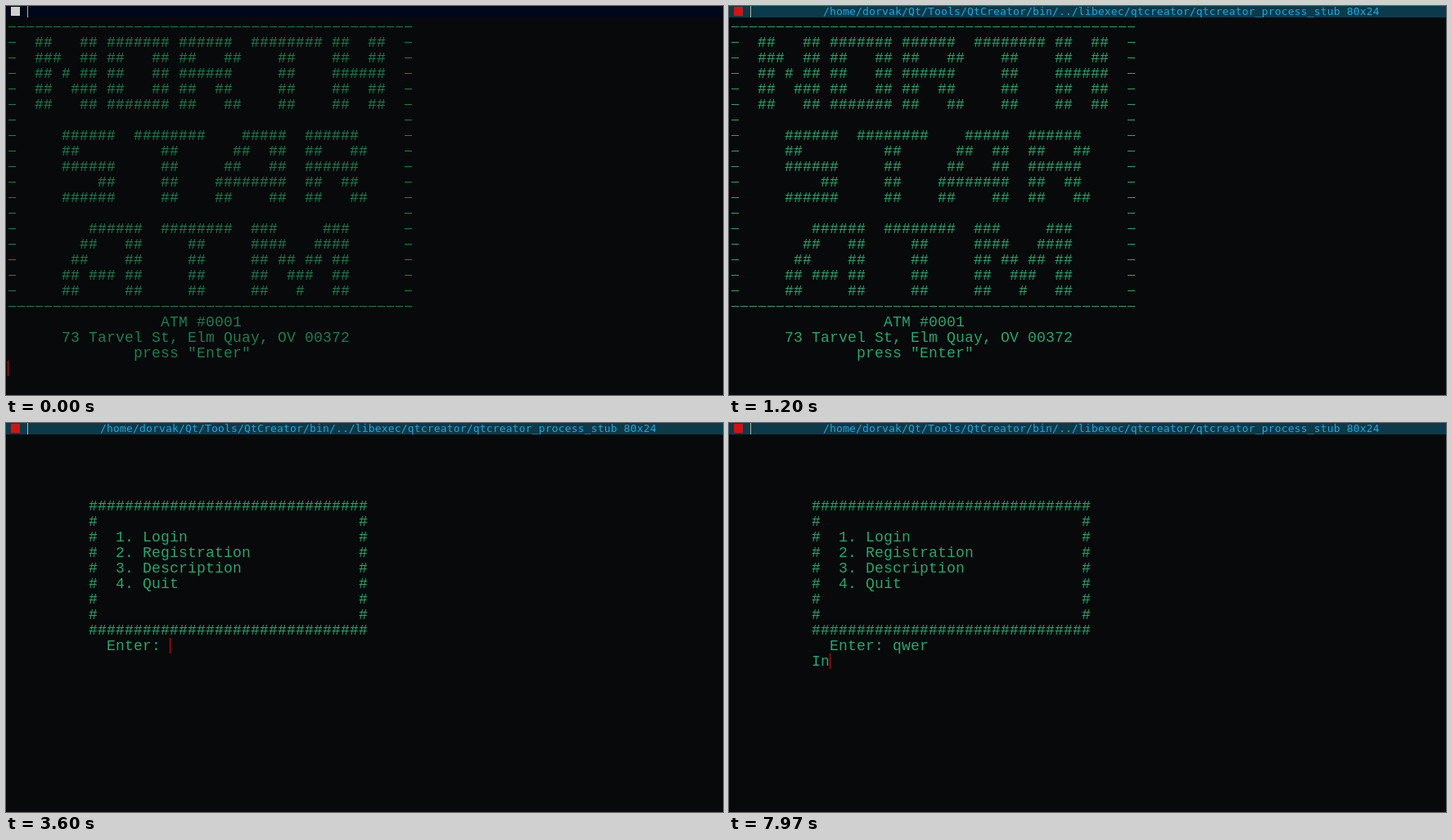
An HTML page for the animation above (8 s loop, 876x476 px).

```html
<!DOCTYPE html>
<html lang="en">
<meta charset="utf-8">
<title>Terminal</title>
<style>
  html, body { margin: 0; width: 100%; height: 100%; overflow: hidden; background: #07090a; }
  body { position: relative; --ink: #1c7d55; --bar: #00061c; --mark: #d0d0c8; }
  body.focused { --ink: #27a673; --bar: #0b3a4a; --mark: #d01414; }
  body * { position: absolute; }
  #bar { left: 0; top: 0; width: 876px; height: 14px; background: var(--bar); }
  #mark { left: 6px; top: 1px; width: 11px; height: 11px; background: var(--mark); }
  #split { left: 26px; top: 0; width: 1px; height: 14px; background: #b4b4a0; }
  #path {
    left: 115px; top: -1px; white-space: pre; color: #22a6e0; visibility: hidden;
    font: 13px/15px "DejaVu Sans Mono", monospace; letter-spacing: .17px;
  }
  .focused #path { visibility: visible; }
  #text {
    left: 2px; top: 17px; margin: 0; color: var(--ink);
    font: 18px/19px "Liberation Mono", monospace; letter-spacing: .2px;
  }
  .row { left: 3px; width: 493px; height: 1px;
    background: repeating-linear-gradient(90deg, var(--ink) 0 9px, transparent 9px 11px); }
  .side { top: 44px; width: 9px; height: 305px;
    background: repeating-linear-gradient(var(--ink) 0 1px, transparent 1px 19px); }
  #caret { width: 1px; height: 19px; background: #c81010; }
  #pointer { left: -4px; top: -8px; fill: none; stroke: #e0e4e4; }
</style>
<body>
<div id="bar"></div>
<div id="mark"></div>
<div id="split"></div>
<div id="path">/home/dorvak/Qt/Tools/QtCreator/bin/../libexec/qtcreator/qtcreator_process_stub 80x24</div>
<div id="border">
  <div class="row" style="top:25px"></div>
  <div class="row" style="top:367px"></div>
  <div class="side" style="left:3px"></div>
  <div class="side" style="left:487px"></div>
</div>
<pre id="text"></pre>
<div id="caret"></div>
<svg id="pointer" width="9" height="16"><path d="M2 1.5h5M2 14.5h5M4.5 1.5v13"/></svg>
<script>
const LOOP = 8000, CELL = 11, LINE = 19;
const FOCUS = 670, MENU = 3370, TYPE = 7130, REPLY = 7830;
const BLINKS = [1200, 1800, 2400, 3000, 3930, 4530, 5130, 5700, 6270, 6870];

const art = `
##   ## ####### ######  ######## ##  ##
###  ## ##   ## ##   ##    ##    ##  ##
## # ## ##   ## ######     ##    ######
##  ### ##   ## ##  ##     ##    ##  ##
##   ## ####### ##   ##    ##    ##  ##

   ######  ########    #####  ######
   ##         ##      ##  ##  ##   ##
   ######     ##     ##   ##  ######
       ##     ##    ########  ##  ##
   ######     ##    ##    ##  ##   ##

      ######  ########  ###     ###
     ##   ##     ##     ####   ####
    ##    ##     ##     ## ## ## ##
   ## ### ##     ##     ##  ###  ##
   ##     ##     ##     ##   #   ##

              ATM #0001
   73 Tarvel St, Elm Quay, OV 00372
           press "Enter"`;
const splash = art.replace(/\n(?=.)/g, "\n   ") + "\n";

const indent = " ".repeat(9), edge = "#".repeat(31);
const boxed = s => "#" + s.padEnd(29) + "#";
const items = ["Login", "Registration", "Description", "Quit"];
const menu = [
  edge, boxed(""), ...items.map((s, i) => boxed(`  ${i + 1}. ${s}`)),
  boxed(""), boxed(""), edge, "  Enter: "
].map(s => indent + s);

const $ = id => document.getElementById(id);

function typed(t) {
  if (t >= REPLY) return "qwer\n" + indent + "In".slice(0, Math.floor((t - REPLY) / 70));
  if (t >= TYPE) return "qwer".slice(0, 1 + Math.floor((t - TYPE) / 46));
  return t >= 4570 && t < 5700 ? "q" : "";
}

function screen(t) {
  if (t < MENU) return splash;
  const shown = Math.floor((t - MENU) / 25) + 1;
  const lines = "\n\n\n\n" + menu.slice(0, shown).join("\n");
  return lines + (shown < menu.length ? "\n" : typed(t));
}

// Pointer glides in, rests, then drops out of the window.
function pointerAt(t) {
  if (t < 30 || t >= 1000) return null;
  if (t < FOCUS) {
    const away = (1 - Math.min(1, (t - 30) / 500)) ** 2;
    return [713 + 160 * away, 272 + 200 * away];
  }
  const p = (t - FOCUS) / 330;
  return [713 - 3 * p, 272 + 212 * p ** 3.3];
}

function draw(now) {
  const t = now % LOOP;
  document.body.className = t >= FOCUS ? "focused" : "";
  $("border").hidden = t >= MENU;

  const text = screen(t), lines = text.split("\n");
  if ($("text").textContent !== text) $("text").textContent = text;

  const caret = $("caret").style;
  caret.left = 2 + CELL * lines.at(-1).length + "px";
  caret.top = 16 + LINE * (lines.length - 1) + "px";
  caret.visibility = BLINKS.filter(b => b <= t).length % 2 ? "hidden" : "visible";

  const at = pointerAt(t), pointer = $("pointer").style;
  pointer.visibility = at ? "visible" : "hidden";
  if (at) pointer.transform = `translate(${Math.round(at[0])}px, ${Math.round(at[1])}px)`;

  requestAnimationFrame(draw);
}
requestAnimationFrame(draw);
</script>
</body>
</html>
```
